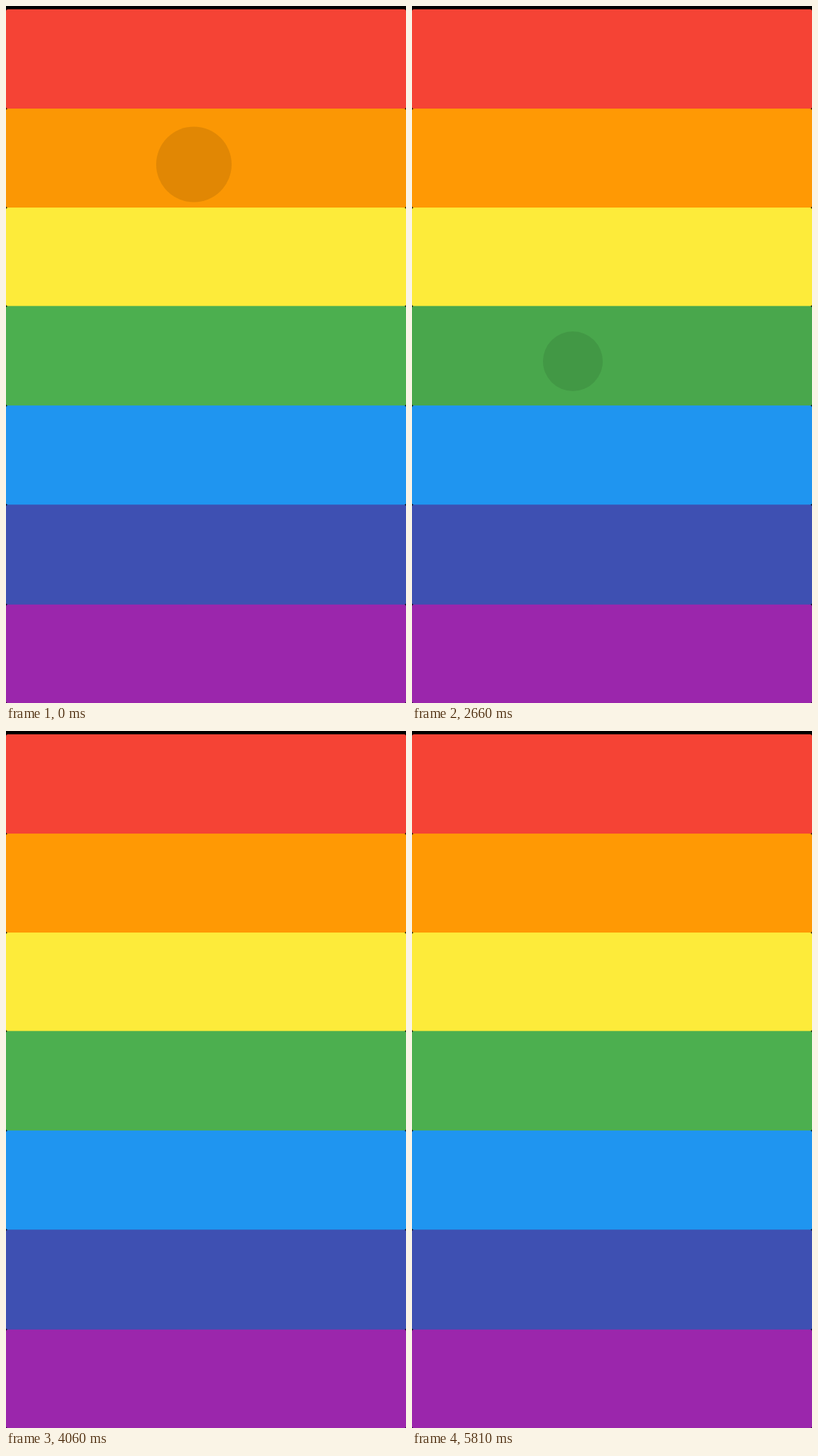
These frames come from a looping animation (562x979 px, 5.88 s). An HTML page:

```html
<!DOCTYPE html>
<html lang="en">
<head>
<meta charset="utf-8">
<title>Colour keys</title>
<style>
html, body { margin: 0; width: 100%; height: 100%; overflow: hidden; background: #000; }
svg { display: block; width: 100vw; height: 100vh; }
</style>
</head>
<body>
<svg id="stage" viewBox="0 0 562 979" preserveAspectRatio="none"></svg>
<script>
const LOOP = 5880, STEP = 70;
const FADE = 200;    // ms until a splash is gone
const SPEED = 1.37;  // splash growth in px per ms
const COLORS = ['#f54335', '#ff9904', '#fdeb3a', '#4caf4f', '#1f95f0', '#3e50b2', '#9b26ac'];
const EDGES = [4.8, 144.3, 283.3, 421.5, 561.3, 700.5, 840.8, 979];

// r is the splash radius at time "at"; dim is the key's highlight then
const TAPS = [
  { key: 1, at: 0,    x: 264,   y: 222.5, r: 53,   peak: .133, dim: .014 },
  { key: 3, at: 700,  x: 286.5, y: 510,   r: 48,   peak: .11,  dim: 0 },
  { key: 5, at: 1960, x: 270,   y: 781,   r: 5.5,  peak: .1,   dim: .004 },
  { key: 3, at: 2660, x: 226,   y: 499,   r: 42,   peak: .107, dim: .042 },
  { key: 0, at: 3640, x: 345,   y: 86,    r: 61.5, peak: .128, dim: .05 },
  { key: 4, at: 4480, x: 315.5, y: 695.5, r: 81,   peak: .108, dim: 0 }
];

const stage = document.getElementById('stage');

function add(parent, tag, attrs) {
  const el = document.createElementNS('http://www.w3.org/2000/svg', tag);
  for (const name in attrs) el.setAttribute(name, attrs[name]);
  parent.appendChild(el);
  return el;
}

function keyShape(i) {
  return { x: 0, y: EDGES[i], width: 562, height: EDGES[i + 1] - EDGES[i], rx: 2.5 };
}

add(stage, 'rect', { width: 562, height: 979, fill: '#000' });
// Overlapping bands keep black out of the seams, except at the rounded corners
COLORS.forEach((fill, i) => {
  add(stage, 'rect', { x: 2, y: EDGES[i], width: 558, height: 979 - EDGES[i], fill });
});
const defs = add(stage, 'defs', {});
COLORS.forEach((fill, i) => {
  add(add(defs, 'clipPath', { id: 'key' + i }), 'rect', keyShape(i));
  add(stage, 'rect', { ...keyShape(i), fill });
});

for (const tap of TAPS) {
  const group = add(stage, 'g', { 'clip-path': `url(#key${tap.key})` });
  tap.shade = add(group, 'rect', { ...keyShape(tap.key), opacity: 0 });
  tap.splash = add(group, 'circle', { cx: tap.x, cy: tap.y, r: 0, opacity: 0 });
}

function draw(time) {
  const t = Math.floor((time % LOOP) / STEP) * STEP;
  for (const tap of TAPS) {
    const age = t - tap.at + tap.r / SPEED;
    const live = age >= 0 && age < FADE;
    const left = live ? 1 - age / FADE : 0;
    const leftAtTap = 1 - tap.r / SPEED / FADE;
    tap.splash.setAttribute('r', live ? age * SPEED : 0);
    tap.splash.setAttribute('opacity', tap.peak * left);
    tap.shade.setAttribute('opacity', tap.dim * left / leftAtTap);
  }
}

const start = performance.now();
function tick() {
  draw(performance.now() - start);
  requestAnimationFrame(tick);
}
draw(0);
requestAnimationFrame(tick);
</script>
</body>
</html>
```
